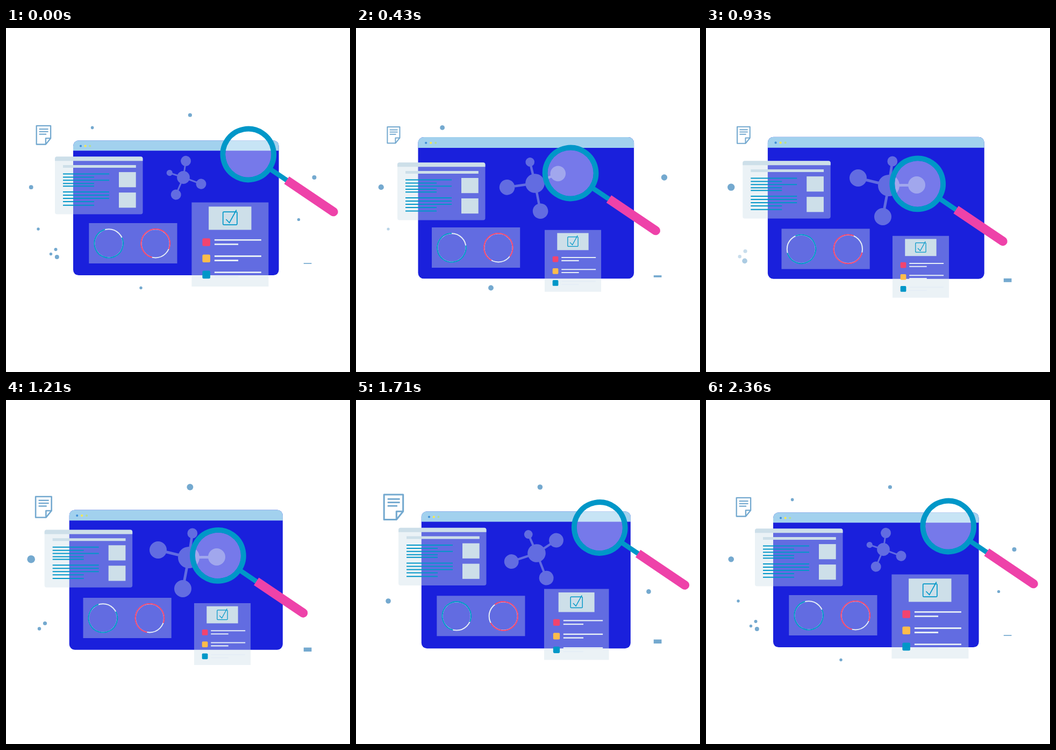
Write an HTML page with a canvas that moves like this. It is 640x640 px and loops after 2430 ms.

```html
<!DOCTYPE html>
<html lang="en">
<head>
<meta charset="utf-8">
<title>Dashboard search</title>
<style>
html, body { margin: 0; height: 100%; overflow: hidden; background: #fff; }
canvas { display: block; width: 100vw; height: 100vh; }
</style>
</head>
<body>
<canvas id="stage" width="640" height="640"></canvas>
<script>
const c = document.getElementById('stage').getContext('2d');
const LOOP = 2430, STEP = 500 / 7;
const KEYS = [0, 6, 10, 17, 24, 29, 33];
const BLUE = '#1a20dc', SKY = '#a2d1ee', PALE = '#cddfe9', TEAL = '#0097c8',
  STEEL = '#74a9cf', PINK = '#ee42a9', ROSE = '#f2446f', AMBER = '#fdbc4b', LIGHT = '#e5eef6';
const RAD = Math.PI / 180;
let k = 0; // current step of the loop

// Smooth monotone curve through one value per key; the last defaults to the first.
function at(...v) {
  if (v.length < KEYS.length) v.push(v[0]);
  let i = 0;
  while (i < KEYS.length - 2 && k >= KEYS[i + 1]) i++;
  const slope = j => (v[j + 1] - v[j]) / (KEYS[j + 1] - KEYS[j]);
  const tangent = j => {
    if (j === 0 || j === KEYS.length - 1) return 0;
    const a = slope(j - 1), b = slope(j);
    return a * b > 0 ? 2 * a * b / (a + b) : 0;
  };
  const h = KEYS[i + 1] - KEYS[i], u = (k - KEYS[i]) / h, w = 1 - u;
  return v[i] * (1 + 2 * u) * w * w + v[i + 1] * u * u * (3 - 2 * u)
    + h * u * w * (tangent(i) * w - tangent(i + 1) * u);
}

function group(x, y, scale, draw, angle = 0) {
  c.save();
  c.translate(x, y);
  c.rotate(angle * RAD);
  c.scale(scale, scale);
  draw();
  c.restore();
}

function box(x, y, w, h, color, r = 0, alpha = 1) {
  c.globalAlpha = alpha;
  c.fillStyle = color;
  c.beginPath();
  c.roundRect(x, y, w, h, r);
  c.fill();
  c.globalAlpha = 1;
}

function disc(x, y, r, color, alpha = 1) {
  c.globalAlpha = alpha;
  c.fillStyle = color;
  c.beginPath();
  c.arc(x, y, r, 0, 2 * Math.PI);
  c.fill();
  c.globalAlpha = 1;
}

function arc(x, y, r, color, width, from = 0, to = 360) {
  c.strokeStyle = color;
  c.lineWidth = width;
  c.beginPath();
  c.arc(x, y, r, from * RAD, to * RAD);
  c.stroke();
}

function line(points, color, width, closed) {
  c.strokeStyle = color;
  c.lineWidth = width;
  c.beginPath();
  for (const [x, y] of points) c.lineTo(x, y);
  if (closed) c.closePath();
  c.stroke();
}

function browser() {
  group(316.3, 334.7, at(1, 1.0497, 1.059, 1.038, 1.017, 1.005), () => {
    box(-191.3, -125.4, 382.6, 250.8, BLUE, 10);
    box(-191.3, -125.4, 382.6, 19, SKY, [10, 10, 0, 0]);
    ['#3f8fd8', '#fde84a', '#b4de96'].forEach((color, i) => disc(-177.3 + i * 8.6, -115.2, 2, color));
  });
}

function article() {
  group(at(91, 77, 67, 71.7, 79, 88.5), at(239.3, 250.2, 250.2, 241.5, 237.8, 236.5), 1, () => {
    box(0, 0, 163.5, 107.2, PALE, 4, .4);
    box(0, 0, 163.5, 8, PALE, [4, 4, 0, 0]);
    box(15, 15.8, 135.8, 5, PALE);
    box(119, 28.8, 31.7, 28.2, PALE);
    box(119, 66.8, 31.7, 28.2, PALE);
    const rows = [[32.2, 1], [38.2, 0], [44, 1], [49.9, 0], [55, 0],
      [65.8, 1], [71.8, 1], [77.7, 1], [83.7, 0], [90.4, 0]];
    for (const [y, long] of rows) box(15, y - 1, long ? 86 : 58, 2, TEAL);
  });
}

function gauges() {
  const turn = at(0, 15, 162, 357, 129, 10);
  group(at(154.3, 141, 139.4, 143.5, 150.3, 154.4), at(363, 371, 376.3, 368, 364.2, 363), 1, () => {
    box(0, 0, 164.2, 75, PALE, 0, .4);
    [[36.9, TEAL, -24], [123.9, ROSE, 104]].forEach(([x, color, start]) => {
      arc(x, 37.8, 26.6, LIGHT, 2);
      arc(x, 37.8, 26.8, color, 2.1, start + turn, start + turn + 279);
    });
  });
}

function molecule() {
  const atoms = [[52, -1, 16], [-11, 58, 16], [-57, -14, 16], [6.8, -45, 9.4]];
  c.globalAlpha = .4;
  group(at(330, 333, 340, 340, 336, 333.5), at(278, 289, 293, 293, 285, 277.5),
    at(.595, .893, 1, 1, .84, .665), () => {
      // One path with a single winding direction, so overlaps stay flat.
      c.fillStyle = PALE;
      c.beginPath();
      for (const [x, y, r] of [[0, 0, 20], ...atoms]) {
        c.moveTo(x + r, y);
        c.arc(x, y, r, 0, 2 * Math.PI);
      }
      for (const [x, y] of atoms) {
        const d = Math.hypot(x, y), nx = -y / d * 2.5, ny = x / d * 2.5;
        c.moveTo(-nx, -ny);
        c.lineTo(x - nx, y - ny);
        c.lineTo(x + nx, y + ny);
        c.lineTo(nx, ny);
        c.closePath();
      }
      c.fill();
    }, at(-80.5, -21.8, 0, 0, -32.2, -67));
  c.globalAlpha = 1;
}

function checklist() {
  group(at(345.4, 351, 345, 350, 350, 346.9), at(324.5, 375.7, 389.5, 378, 351.5, 332.5),
    at(1, .735, .735, .735, .843, .952), () => {
      box(0, 0, 143, 156.5, PALE, 0, .4);
      box(31.7, 7.8, 79.4, 43.2, PALE);
      c.strokeStyle = TEAL;
      c.lineWidth = 1.7;
      c.beginPath();
      c.roundRect(58.3, 17.6, 26.2, 24, 1.5);
      c.stroke();
      line([[64, 31.5], [70.2, 37.8], [83.3, 14]], TEAL, 1.7);
      [ROSE, AMBER, TEAL].forEach((color, i) => {
        const y = 66.7 + i * 30.2;
        box(20, y, 14.6, 14.6, color, 2.5);
        box(42.5, y + 1.7, 87, 2.8, LIGHT);
        box(42.5, y + 9.7, 44.2, 2.8, LIGHT);
      });
    });
}

function magnifier() {
  group(at(450.8, 399.1, 393.6, 394.4, 453.3, 450.8), at(235, 270, 290, 289.4, 237.5, 235), 1, () => {
    box(49, -4.5, 40, 9, TEAL);
    box(86.1, -8.4, 113.5, 16.8, PINK, [0, 8.4, 8.4, 0]);
    disc(0, 0, 43, '#fff', .4);
    arc(0, 0, 47.4, TEAL, 9.8);
  }, 34);
}

function note() {
  group(69.9, 199.2, at(1, .875, .8, 1.12, 1.345, 1.15), () => {
    c.lineJoin = 'round';
    line([[-13.2, -17.3], [13.2, -17.3], [13.2, 6], [4, 17.3], [-13.2, 17.3]], STEEL, 2.3, true);
    line([[4, 17.3], [4, 6], [13.2, 6]], STEEL, 2.3);
    [[-11.1, 17], [-6.4, 17], [-1.6, 13.5]].forEach(([y, w]) => box(-8.3, y - 1.1, w, 2.2, STEEL));
  });
}

// A dot is hidden from step `off` to step `on`, half faded at either edge.
function blinker(x, y, off, on, ...radii) {
  if (k >= off && k < on) return;
  disc(x, y, at(...radii), STEEL, k === off - 1 || k === on ? .5 : 1);
}

function dots() {
  blinker(342.4, 162, 5, 15, 3.6, 6, 6.2, 6, 4.8, 4);
  blinker(160.6, 185.4, 12, 27, 2.8, 4.4, 3.8, 5, 5, 3.9);
  blinker(46.7, 296.2, 20, 31, 3.9, 5.1, 6, 7.3, 7.6, 7.6, 5.3);
  blinker(573.5, 278, 13, 26, 4, 5.7, 6.7, 7.3, 7.3, 6);
  blinker(251, 483.5, 9, 30, 2.7, 4.9, 5, 5, 5, 4.8);
  blinker(60, 374, 7, 22, 2.7, 2.6, 4, 5, 4.8, 3.5);
  blinker(544.5, 356.4, 4, 21, 2.7, 4, 4.5, 5, 4.3, 3.3);

  disc(at(94.8, 82, 75, 70, 80, 89.5), at(426, 430, 432.5, 434, 433, 429.5),
    at(4, 4.5, 4.8, 4.8, 4.2, 4), STEEL, at(1, 0, 1, 0, 0, .5));
  disc(at(92.5, 80, 74, 72.5, 80, 87), at(412, 414, 415, 415.5, 416, 415.5),
    at(3, 3.3, 3.5, 3.6, 3.2, 2.8), STEEL, at(1, 0, 0, 1, 0, .25));
  disc(at(83.5, 70, 64, 62, 70, 79), at(420.5, 423, 425, 425.5, 424, 422),
    at(2.7, 3, 3.2, 3.2, 3, 2.8), STEEL, at(1, 0, 0, 1, 0, 0));

  const h = at(1.7, 3.7, 6, 7.5, 7.5, 4);
  box(553.8, at(438, 462, 471, 464.3, 449.3, 440.6) - h / 2, 14.7, h, STEEL);
}

function frame(now) {
  const t = now % LOOP;
  k = Math.min(33, Math.floor((Math.floor(t / 10) * 10 + 5) / STEP));
  c.clearRect(0, 0, 640, 640);
  dots();
  note();
  browser();
  article();
  gauges();
  molecule();
  checklist();
  magnifier();
}

const start = performance.now();
function tick() {
  frame(performance.now() - start);
  requestAnimationFrame(tick);
}
tick();
</script>
</body>
</html>
```
